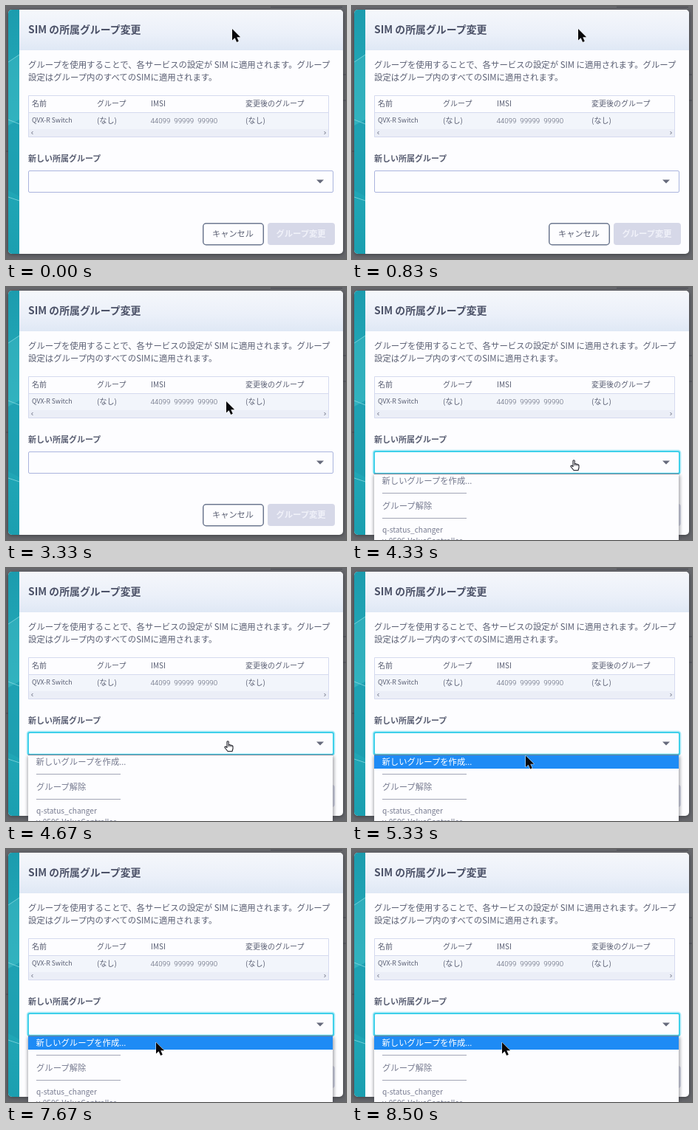
An HTML page that plays this animation: 460 px wide and 343 px high, repeating every 8.67 s.

```html
<!DOCTYPE html>
<html lang="ja">
<head>
<meta charset="utf-8">
<style>
  html, body { margin: 0; width: 100%; height: 100%; overflow: hidden; background: #66676b; }
  svg { display: block; font-family: "Noto Sans CJK JP", "Noto Sans CJK", "Noto Sans", sans-serif; fill: #5a5f73; }
  .title { font-size: 13.9px; font-weight: 700; fill: #4c5268; }
  .body { font-size: 11.4px; }
  .cell { font-size: 10px; }
  .name { font-size: 8.8px; }
  .imsi { font: 300 9.7px Roboto, sans-serif; word-spacing: 2.6px; }
  .label { font-size: 11px; font-weight: 700; }
  .item { font-size: 11.35px; fill: #777b90; }
  .dots { font-family: "Noto Sans", sans-serif; }
  .latin { font-size: 10.1px; fill: #777b90; }
  .line { fill: none; stroke: #d5daef; }
</style>
</head>
<body>
<svg width="460" height="343" viewBox="0 0 460 343">
  <defs>
    <linearGradient id="head" x2="0" y2="1">
      <stop offset="0" stop-color="#f5f7fb"/>
      <stop offset=".6" stop-color="#ebf0f9"/>
      <stop offset="1" stop-color="#dfe8f5"/>
    </linearGradient>
    <linearGradient id="side" x2="0" y2="1">
      <stop offset="0" stop-color="#1c9cae"/>
      <stop offset=".5" stop-color="#25adbb"/>
      <stop offset="1" stop-color="#1b9fb0"/>
    </linearGradient>
    <filter id="soft" x="-10%" y="-10%" width="120%" height="120%"><feGaussianBlur stdDeviation="2"/></filter>
    <clipPath id="modal"><rect x="3" y="5" width="453" height="331" rx="5"/></clipPath>
  </defs>

  <rect width="460" height="343" fill="#66676b"/>
  <path d="M358 1.5H455M456 93h4M456 128h4M0 197h3" stroke="#4a4b52" fill="none"/>
  <rect x="2" y="6" width="455" height="332" rx="6" fill="#33343a" opacity=".6" filter="url(#soft)"/>

  <g clip-path="url(#modal)">
    <rect x="3" y="5" width="453" height="331" fill="#fdfdff"/>
    <rect x="18" y="5" width="438" height="55" fill="url(#head)"/>
    <rect x="3" y="5" width="15" height="331" fill="url(#side)"/>
    <path d="M3 76L18 66V154L3 162Z" fill="#3db8c4" opacity=".55"/>
    <path d="M3 162L18 154V258L3 250Z" fill="#1a98ab" opacity=".5"/>
    <path d="M3 76L18 66M3 154L18 160M3 259L18 264" stroke="#86d8e0" fill="none" stroke-width=".8"/>
  </g>

  <text class="title" x="30" y="37">SIM の所属グループ変更</text>
  <g class="body">
    <text x="30" y="83.5">グループを使用することで、各サービスの設定が SIM に適用されます。グループ</text>
    <text x="30" y="101">設定はグループ内のすべてのSIMに適用されます。</text>
  </g>

  <rect x="30" y="144" width="407" height="23" fill="#f2f5fb"/>
  <rect x="30" y="167" width="407" height="11" fill="#ebeef7"/>
  <path class="line" d="M30.5 121.5H436.5V177.5H30.5ZM30 144.5H437"/>
  <path d="M36.5 170l-2 2 2 2M430.5 170l2 2-2 2" fill="none" stroke="#6f7386"/>
  <g class="cell">
    <text x="35" y="136">名前</text>
    <text x="123" y="136">グループ</text>
    <text x="196" y="136">IMSI</text>
    <text x="324" y="136">変更後のグループ</text>
    <text x="123" y="158.5">(なし)</text>
    <text x="324" y="158.5">(なし)</text>
  </g>
  <text class="name" x="35" y="158">QVX-R Switch</text>
  <text class="imsi" x="195.5" y="158.5">44099 99999 99990</text>

  <text class="label" x="30" y="211">新しい所属グループ</text>
  <rect x="30.5" y="223.5" width="412" height="29" rx="1.5" fill="#fdfdff" stroke="#aab4de"/>
  <g id="focus" fill="none" stroke="#3fd0ea">
    <rect x="29" y="222" width="415" height="31" rx="3" stroke-width="3" opacity=".35"/>
    <rect x="30" y="223" width="413" height="30" rx="2" stroke-width="2"/>
  </g>
  <path d="M420 235.5h10l-5 5Z" fill="#666a7c"/>

  <rect x="266.75" y="294.75" width="81.5" height="29" rx="4" fill="#fdfdff" stroke="#6d7890" stroke-width="1.5"/>
  <text x="307" y="313" text-anchor="middle" font-size="11.2">キャンセル</text>
  <rect x="354" y="294" width="91" height="30" rx="4" fill="#d6d8e8"/>
  <text x="399" y="313" text-anchor="middle" font-size="11.3" font-weight="700" fill="#f0f1f9">グループ変更</text>

  <g id="list">
    <rect x="29" y="255" width="415" height="95" fill="#40424c" opacity=".45" filter="url(#soft)"/>
    <rect x="30" y="253" width="412" height="95" fill="#fdfdff"/>
    <path d="M30 253.5H442" stroke="#7b7f90"/>
    <rect id="bar" x="30" y="254" width="412" height="18" fill="#1e8bf5"/>
    <text id="first" class="item" x="40.5" y="267">新しいグループを作成<tspan class="dots">...</tspan></text>
    <path d="M41 279.5H155M41 313.5H155" stroke="#a2a5b6"/>
    <text class="item" x="41" y="300.5">グループ解除</text>
    <text class="latin" x="41" y="333">q-status_changer</text>
    <text class="latin" x="41" y="348">v-0506-ValueController</text>
  </g>

  <path id="arrow" d="M0 0V15.5L3.6 12.2 6.2 18 8.8 16.8 6.3 11.2H11.2Z" fill="#08080b" stroke="#fff" paint-order="stroke"/>
  <g id="hand" stroke="#20212a">
    <path d="M-1 8.5V.8a1.1 1.1 0 0 1 2.2 0V5q1.3-.8 2.1.2 1.3-.5 2 .6 1.7-.3 1.7 1.3V10L6 13.5H0L-4 8.5q-.2-1.8 1.5-1.2Z"
      fill="#fff" stroke-width="1.1" stroke-linejoin="round"/>
    <path d="M1.2 5V7.5M3.3 5.2V7.5M5.3 5.8V7.5" stroke-width=".8"/>
  </g>
</svg>
<script>
  const LOOP = 8670, STEP = 1000 / 6, OPEN = 26;
  // step, x, y of the pointer tip
  const path = [
    [0, 306, 31], [14, 306, 31], [20, 298, 155], [24, 300, 235],
    [28, 300, 235], [32, 235, 254.5], [36, 203, 262], [60, 203, 262]
  ];
  const $ = id => document.getElementById(id);
  const show = (id, on) => { $(id).style.display = on ? '' : 'none'; };

  function pointer(step) {
    const i = path.findIndex(p => p[0] > step);
    const [s0, x0, y0] = path[i - 1], [s1, x1, y1] = path[i];
    const u = (step - s0) / (s1 - s0), e = u * u * (3 - 2 * u);
    return [x0 + (x1 - x0) * e, y0 + (y1 - y0) * e];
  }

  function draw(ms) {
    // small lead, as step times are rounded to 10 ms
    const step = Math.min(51, Math.floor((ms % LOOP + 5) / STEP));
    const [x, y] = pointer(step);
    const open = step >= OPEN;
    const onSelect = y >= 223 && y < 253;
    const onItem = open && y >= 253;

    show('focus', open);
    show('list', open);
    show('bar', onItem);
    $('first').style.fill = onItem ? '#fff' : '';
    show('hand', onSelect);
    show('arrow', !onSelect);
    $(onSelect ? 'hand' : 'arrow').setAttribute('transform', `translate(${x} ${y})`);
  }

  const start = performance.now();
  function tick() {
    draw(performance.now() - start);
    requestAnimationFrame(tick);
  }
  tick();
</script>
</body>
</html>
```
